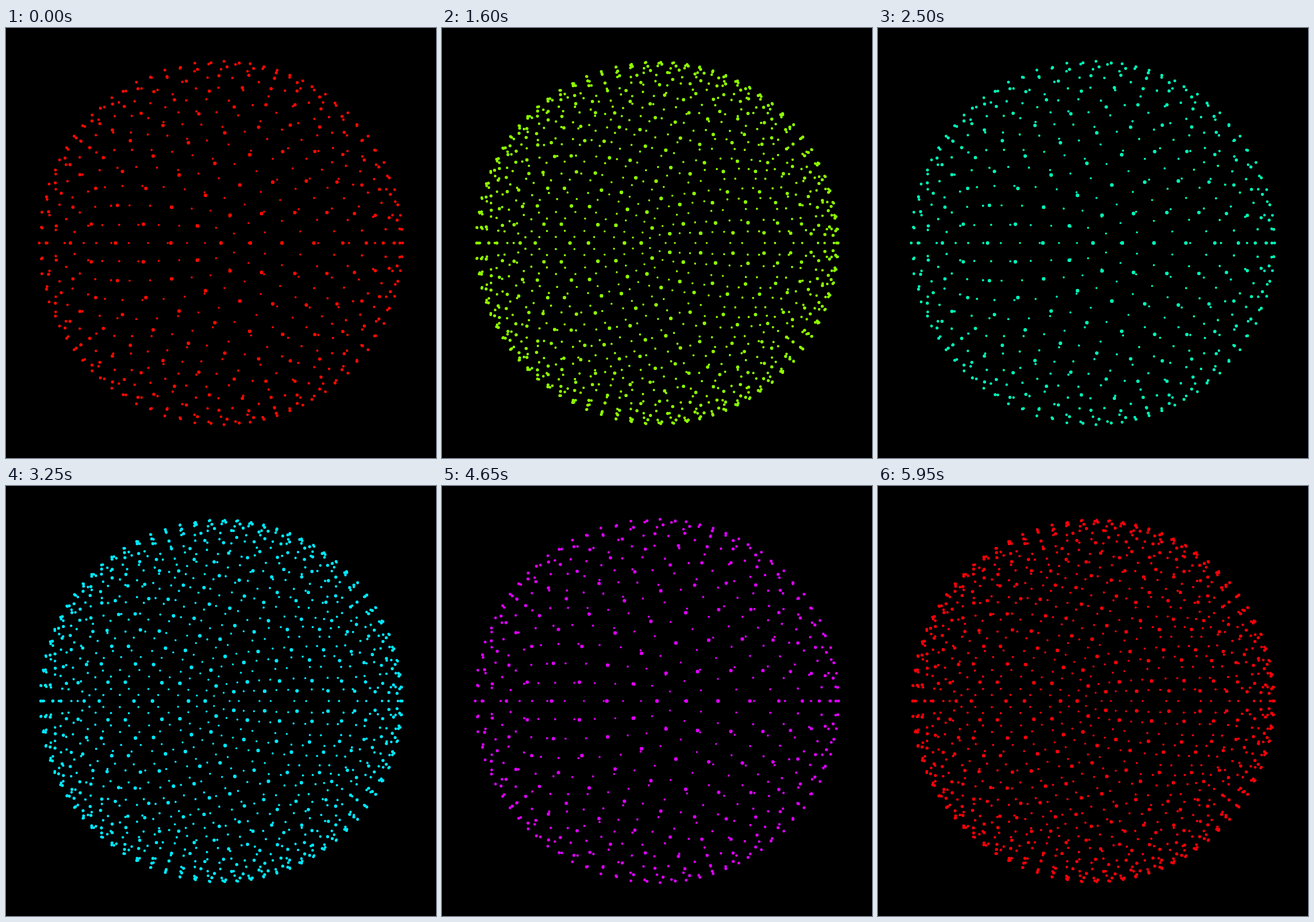
Write an HTML page with a canvas that moves like this. It is 748 px wide and 748 px high and loops after 6 s.

```html
<!DOCTYPE html>
<html lang="en">
<head>
<meta charset="utf-8">
<title>Geodesic dots</title>
<style>
  html, body { margin: 0; width: 100%; height: 100%; overflow: hidden; background: #000; }
  canvas { display: block; width: 748px; height: 748px; }
</style>
</head>
<body>
<canvas id="stage" width="748" height="748"></canvas>
<script>
const ctx = document.getElementById('stage').getContext('2d');
const SIZE = 748, MID = SIZE / 2;
const CAMERA = 3.4;
const FOCAL = MID / Math.tan(Math.PI / 9); // 40 degree field of view
const DOT = 0.0075;
const FREQ = 8;
const STEP = 50, STEPS_PER_COLOR = 20;
const COLORS = [[255, 0, 0], [255, 255, 0], [0, 255, 0], [0, 255, 255], [0, 0, 255], [255, 0, 255]];

const unit = p => {
  const len = Math.hypot(...p);
  return p.map(c => c / len);
};
const centroid = (a, b, c) => a.map((v, i) => (v + b[i] + c[i]) / 3);

// Icosahedron with one corner facing the viewer.
function icosahedronFaces() {
  const h = 1 / Math.sqrt(5);
  const ring = (z, turn) => Array.from({ length: 5 }, (_, i) => {
    const a = (i + turn) * Math.PI * 2 / 5;
    return [2 * h * Math.cos(a), 2 * h * Math.sin(a), z];
  });
  const front = ring(h, 0), back = ring(-h, 0.5);
  const faces = [];
  for (let i = 0; i < 5; i++) {
    const j = (i + 1) % 5;
    faces.push(
      [[0, 0, 1], front[i], front[j]],
      [front[i], back[i], front[j]],
      [back[i], back[j], front[j]],
      [[0, 0, -1], back[i], back[j]]
    );
  }
  return faces;
}

// Corners of the subdivided sphere, and the centres of its triangles.
function buildPoints() {
  const corners = new Map(), centers = [];
  for (const [a, b, c] of icosahedronFaces()) {
    const at = (i, j) => unit(a.map((v, k) => v + ((b[k] - v) * i + (c[k] - v) * j) / FREQ));
    for (let i = 0; i <= FREQ; i++) {
      for (let j = 0; i + j <= FREQ; j++) {
        const p = at(i, j);
        corners.set(p.map(v => Math.round(v * 1e4)).join(), p);
        if (i + j < FREQ) centers.push(centroid(p, at(i + 1, j), at(i, j + 1)));
        if (i + j < FREQ - 1) centers.push(centroid(at(i + 1, j), at(i, j + 1), at(i + 1, j + 1)));
      }
    }
  }
  return [[...corners.values()], centers];
}

function toPath(points) {
  const path = new Path2D();
  for (const [x, y, z] of points) {
    const scale = FOCAL / (CAMERA - z);
    const px = MID + x * scale, py = MID - y * scale, r = DOT * scale;
    path.moveTo(px + r, py);
    path.arc(px, py, r, 0, Math.PI * 2);
  }
  return path;
}

const paths = buildPoints().map(toPath);

function draw(time) {
  const step = Math.floor(time / STEP) % (STEPS_PER_COLOR * COLORS.length);
  const index = Math.floor(step / STEPS_PER_COLOR);
  const angle = (step % STEPS_PER_COLOR + 0.5) / STEPS_PER_COLOR * Math.PI / 2;
  const mix = index % 2 ? 1 - Math.cos(angle) : Math.sin(angle);
  const next = COLORS[(index + 1) % COLORS.length];
  const rgb = COLORS[index].map((v, i) => Math.round(v + (next[i] - v) * mix));
  ctx.fillStyle = '#000';
  ctx.fillRect(0, 0, SIZE, SIZE);
  ctx.fillStyle = `rgb(${rgb})`;
  ctx.fill(paths[index % 2]);
}

const start = performance.now();
function tick() {
  draw(performance.now() - start);
  requestAnimationFrame(tick);
}
tick();
</script>
</body>
</html>
```
